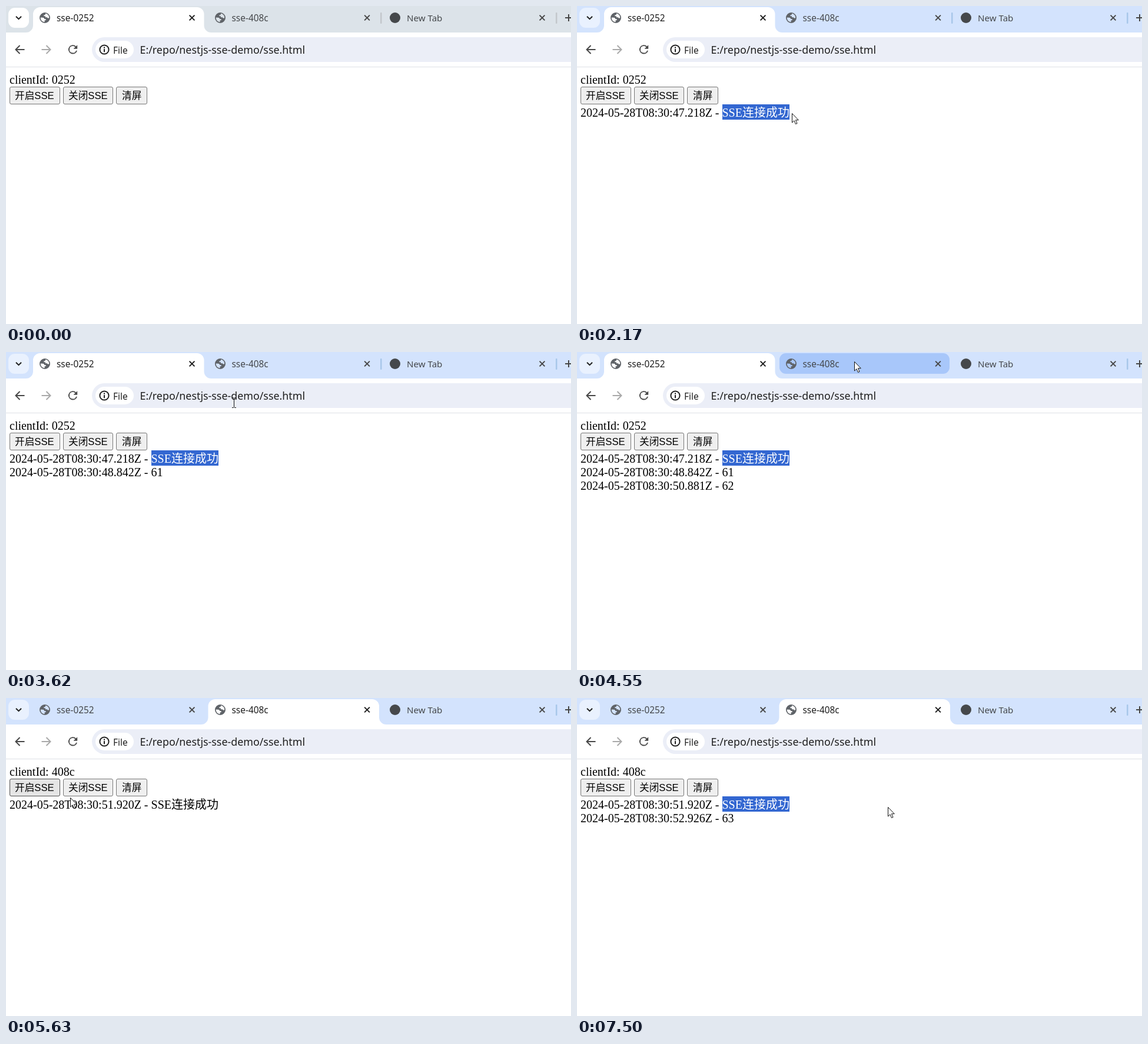
An HTML page that plays this animation: 960 px wide and 540 px high, repeating every 8000 ms.

```html
<!DOCTYPE html>
<html lang="zh-CN">
<head>
<meta charset="utf-8">
<title>SSE demo</title>
<style>
html, body { margin: 0; width: 100%; height: 100%; overflow: hidden; background: #fff; }
svg { display: block; width: 960px; height: 540px; }
text { white-space: pre; }
.ui { font-family: "Noto Sans", "Open Sans", sans-serif; font-size: 15.4px; fill: #1f1f1f; }
.page { font-family: "Liberation Serif", "Noto Sans CJK SC", "Noto Sans CJK", serif; font-size: 20px; }
.btn text { font-family: "Liberation Sans", "Noto Sans CJK SC", "Noto Sans CJK", sans-serif; font-size: 16.67px; }
.btn rect { fill: #efefef; stroke: #767676; }
.btn.hover rect { fill: #e5e5e5; stroke: #4f4f4f; }
.icon { fill: none; stroke: #474747; stroke-width: 2; }
.dark { stroke: #1f1f1f; }
.pale { stroke: #a9a9a9; }
</style>
</head>
<body>
<svg viewBox="0 0 960 540" xmlns="http://www.w3.org/2000/svg">
  <defs>
    <g id="globe">
      <path fill="#5f6368" fill-rule="evenodd" d="M0-9A9 9 0 1 1 0 9A9 9 0 1 1 0-9Z
        M1-7.2C4.6-6.8 7.2-3.8 7.3-.2C6 1.4 4.6 .8 4 -.8H1V-2.8H-1.6V-4.8H.2C1-5.2 1-6 1-7.2Z
        M-7.2-.6L-3-.2C-1.4 0-1 .8-1 2H1.6V4.2H-.4V7.2C-4.4 7-7.4 3.6-7.2-.6Z"/>
    </g>
    <path id="cross" d="M-4.4-4.4L4.4 4.4M4.4-4.4L-4.4 4.4" stroke-width="2"/>
    <clipPath id="selClip"><rect id="clipBox" x="247" y="167" height="26"/></clipPath>
  </defs>

  <rect id="strip" width="960" height="45"/>
  <rect id="search" x="4" y="3" width="35" height="34" rx="11"/>
  <path class="icon dark" d="M17 17.7L21.5 22.2L26 17.7"/>
  <rect id="tabHover" x="344" y="2" width="289" height="35" rx="11" fill="#a8c7fa"/>
  <path id="tab" fill="#fff" d="M34 45A12 12 0 0 0 46 33V14A12 12 0 0 1 58 2H324.5A12 12 0 0 1 336.5 14V33A12 12 0 0 0 348.5 45Z"/>
  <g id="seps">
    <rect id="sep" x="636" y="11" width="2.5" height="19" rx="1"/>
    <rect x="934" y="11" width="2.5" height="19" rx="1"/>
  </g>
  <use href="#globe" x="66" y="20"/>
  <use href="#globe" x="364" y="20"/>
  <circle cx="661" cy="20" r="9" fill="#45484b"/>
  <g class="ui">
    <text id="name0" x="86" y="26">sse-0252</text>
    <text id="name1" x="383.5" y="26">sse-408c</text>
    <text x="681" y="26" fill="#45484b" style="font-size:15.1px">New Tab</text>
  </g>
  <use id="x0" href="#cross" x="316" y="20"/>
  <use id="x1" href="#cross" x="613.5" y="20"/>
  <use href="#cross" x="911" y="20" stroke="#474747"/>
  <path class="icon" d="M950 20H962M956 14V26"/>

  <path class="icon" d="M31.5 74H17M23.5 67L16.5 74L23.5 81"/>
  <path class="icon pale" d="M60.5 74H75M68.5 67L75.5 74L68.5 81"/>
  <path transform="translate(102.2 62.4) scale(.95)" fill="#474747"
    d="M17.65 6.35A8 8 0 1 0 19.73 14H17.65A6 6 0 1 1 12 6C13.66 6 15.14 6.69 16.22 7.78L13 11H20V4Z"/>
  <rect id="omni" x="146" y="53" width="860" height="42" rx="21"/>
  <rect x="152" y="59" width="65" height="30" rx="15" fill="#fff"/>
  <circle class="icon dark" cx="167" cy="74" r="7.6"/>
  <path class="icon dark" d="M167 73V78.3M167 69.6V71.7"/>
  <g class="ui">
    <text x="182" y="81">File</text>
    <text x="227.5" y="81" style="font-size:17.85px">E:/repo/nestjs-sse-demo/sse.html</text>
  </g>
  <rect y="103" width="960" height="1" fill="#dee1e6"/>

  <g class="page">
    <text id="client" x="6" y="132"></text>
    <text id="line0" x="6" y="188"></text>
    <text id="line1" x="6" y="211"></text>
    <text id="line2" x="6" y="234"></text>
    <g clip-path="url(#selClip)">
      <rect x="247" y="167" width="114" height="26" fill="#3367d1"/>
      <text x="246.5" y="188" fill="#fff">SSE连接成功</text>
    </g>
  </g>
  <g class="btn" id="open"><rect x="6.5" y="137.5" width="85" height="29" rx="2.5"/><text x="15" y="158">开启SSE</text></g>
  <g class="btn"><rect x="97.5" y="137.5" width="84" height="29" rx="2.5"/><text x="106" y="158">关闭SSE</text></g>
  <g class="btn"><rect x="187.5" y="137.5" width="52" height="29" rx="2.5"/><text x="197" y="158">清屏</text></g>

  <path id="arrow" fill="#fff" stroke="#111" d="M.5 .5V16L4 12.7L6.5 18.5L9 17.4L6.5 11.7H11.3Z"/>
  <path id="beam" fill="none" stroke="#111" d="M-3.5-8.5H-1L0-7.5L1-8.5H3.5M0-7.5V7.5M-3.5 8.5H-1L0 7.5L1 8.5H3.5"/>
</svg>
<script>
const LOOP = 8000, ENTER = 190, SWITCH = 4750;
const CLOCK = 46331;    // log clock, in ms past the minute, when the loop starts
const DRAG_TIME = 320, HOVER_LAG = 80;
const OPEN = [62, 152], MSG = [247, 181], MSG_END = [365, 182], TAB2 = [471, 16];

const $ = id => document.getElementById(id);
const set = (id, name, value) => $(id).setAttribute(name, value);
const show = (id, on) => set(id, 'visibility', on ? 'visible' : 'hidden');
const clamp = (v, a, b) => Math.min(b, Math.max(a, v));
const inBox = ([x, y], left, top, right, bottom) => x >= left && x <= right && y >= top && y <= bottom;

// Each tab: connect, swing below the buttons, then drag over the message.
const sessions = [
  { id: '0252', arrive: 600, leave: 860, dip: [181, 227], reach: 1370, drag: 1420,
    log: [[47218, 'SSE连接成功'], [48842, 61], [50881, 62]] },
  { id: '408c', arrive: 5380, leave: 5560, dip: [201, 201], reach: 6260, drag: 6460,
    log: [[51920, 'SSE连接成功'], [52926, 63]] }
];
const visit = s => [
  [s.arrive, OPEN], [s.leave, OPEN], [s.leave + 210, s.dip],
  [s.reach, MSG], [s.drag, MSG], [s.drag + DRAG_TIME, MSG_END]
];
const path = [
  [ENTER, [330, 434]], ...visit(sessions[0]),
  [2170, MSG_END], [2600, [528, 66]], [3000, [382, 183]], [3210, [235, 213]],
  [3850, TAB2], [5020, TAB2], ...visit(sessions[1]),
  [7220, [350, 172]], [7500, [528, 185]]
];

function pointer(t) {
  const i = path.findIndex(p => p[0] > t);
  if (i < 1) return path.at(i)[1];
  const [t0, from] = path[i - 1], [t1, to] = path[i];
  const k = (t - t0) / (t1 - t0);
  return from.map((v, n) => v + (to[n] - v) * k);
}

function drawTabs(focused, second, hover) {
  set('strip', 'fill', focused ? '#d3e3fd' : '#dce3e9');
  set('search', 'fill', focused ? '#e9f1fe' : '#fff');
  set('seps', 'fill', focused ? '#a8c7ea' : '#c3c7cb');
  set('tab', 'transform', `translate(${second ? 297.5 : 0})`);
  show('tabHover', hover);
  show('sep', !hover && !second);
  [0, 1].forEach(i => {
    const active = second === (i === 1);
    $('name' + i).style.fill = active ? '#1f1f1f' : '#45484b';
    set('x' + i, 'stroke', active ? '#1f1f1f' : '#474747');
  });
}

function drawPage(t, session, x) {
  $('client').textContent = 'clientId: ' + session.id;
  for (let i = 0; i < 3; i++) {
    const [stamp, message] = session.log[i] || [Infinity];
    $('line' + i).textContent = t + CLOCK >= stamp
      ? `2024-05-28T08:30:${(stamp / 1000).toFixed(3)}Z - ${message}` : '';
  }
  const since = t - session.drag;
  const width = since < 0 ? 0 : since < DRAG_TIME ? clamp(x - MSG[0], 0, 114) : 114;
  set('clipBox', 'width', width);
}

function draw(t) {
  const second = t >= SWITCH, session = sessions[+second];
  const at = pointer(t), trail = pointer(t - HOVER_LAG);
  const [x, y] = at.map(Math.round);

  drawTabs(t >= sessions[0].leave - 100, second, !second && inBox(trail, 344, 2, 633, 37));
  drawPage(t, session, at[0]);
  set('omni', 'fill', inBox(trail, 146, 53, 960, 95) ? '#e7eaf3' : '#ebeef7');
  $('open').classList.toggle('hover', inBox(trail, 6, 137, 92, 167));

  const overMessage = t + CLOCK >= session.log[0][0] && inBox(at, 6, 171, 361, 193);
  const beam = overMessage || inBox(at, 228, 53, 960, 95);
  show('arrow', t >= ENTER && !beam);
  show('beam', beam);
  set('arrow', 'transform', `translate(${x} ${y})`);
  set('beam', 'transform', `translate(${x + .5} ${y})`);
}

const start = performance.now();
function tick() {
  draw((performance.now() - start) % LOOP);
  requestAnimationFrame(tick);
}
tick();
</script>
</body>
</html>
```
